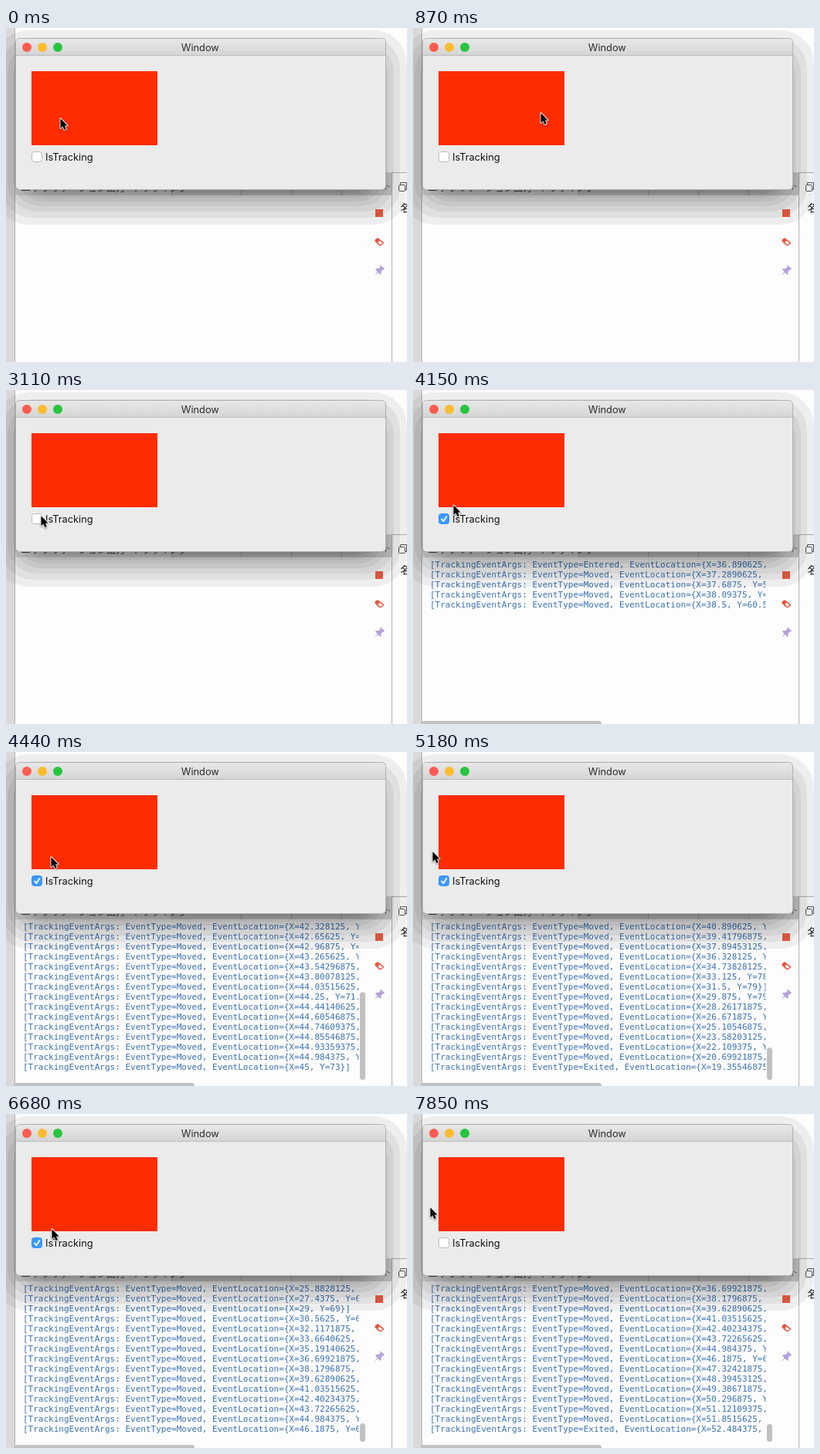
An HTML page with a canvas for the animation above (8 s loop, 519 by 433 pixels).

```html
<!DOCTYPE html>
<html lang="en">
<head>
<meta charset="utf-8">
<title>Mouse tracking demo</title>
<style>
html, body { margin: 0; width: 100%; height: 100%; overflow: hidden; background: #fdfdfd; }
canvas { display: block; }
</style>
</head>
<body>
<canvas id="stage" width="519" height="433"></canvas>
<script>
const ctx = document.getElementById('stage').getContext('2d');
const LOOP = 8000, STEP = 148.1, LAST_STEP = 53;
const CHECK_ON = 25, CHECK_OFF = 49, MOVES_PER_STEP = 12;
const UI_FONT = '12.8px Inter, sans-serif';
const CJK_FONT = '12px "Noto Sans CJK JP", "Noto Sans CJK", sans-serif';
const LOG_FONT = '11px "DejaVu Sans Mono", monospace';
const ROWS = 15, ROW_HEIGHT = 13;
const WIN = { x: 13, y: 13, w: 478, h: 196 };
const VIEW = { x: 33, y: 56, w: 163, h: 96 };

// Turning points of the pointer: [step, x, y].
const route = [
  [0, 70, 117], [5, 199, 109], [8, 66, 111], [12, 16, 112], [14, 16, 112],
  [20, 49, 163], [21, 45, 163], [26, 45, 161], [30, 58, 136], [32, 64, 131],
  [35, 25, 129], [36, 24, 128], [39, 58, 128], [41, 22, 127], [42, 17, 127],
  [46, 67, 153], [47, 62, 165], [49, 46, 165], [LAST_STEP, 22, 121]
];

function pointerAt(step) {
  const next = Math.max(1, route.findIndex(point => point[0] >= step));
  const [s0, x0, y0] = route[next - 1], [s1, x1, y1] = route[next];
  const u = (step - s0) / (s1 - s0), eased = u * u * (3 - 2 * u);
  return { x: x0 + (x1 - x0) * eased, y: y0 + (y1 - y0) * eased };
}

// The log follows from the route: every sample over the red view is reported.
function buildLog() {
  const entries = [], snap = v => Math.round(v * 256) / 256;
  let wasInside = false;
  for (let i = CHECK_ON * MOVES_PER_STEP; i < CHECK_OFF * MOVES_PER_STEP; i++) {
    const step = i / MOVES_PER_STEP, { x, y } = pointerAt(step);
    const inside = x >= VIEW.x && x < VIEW.x + VIEW.w && y >= VIEW.y && y < VIEW.y + VIEW.h;
    if (inside || wasInside) {
      const type = !inside ? 'Exited' : wasInside ? 'Moved' : 'Entered';
      const place = `{X=${snap(x - WIN.x)}, Y=${snap(WIN.y + WIN.h - y)}}`;
      entries.push({ step, line: `[TrackingEventArgs: EventType=${type}, EventLocation=${place}]` });
    }
    wasInside = inside;
  }
  return entries;
}
const log = buildLog();

function rect(x, y, w, h, fill) {
  ctx.fillStyle = fill;
  ctx.fillRect(x, y, w, h);
}

function rounded(x, y, w, h, r, fill, stroke) {
  ctx.beginPath();
  ctx.roundRect(x, y, w, h, r);
  if (fill) { ctx.fillStyle = fill; ctx.fill(); }
  if (stroke) { ctx.strokeStyle = stroke; ctx.lineWidth = 1; ctx.stroke(); }
}

function text(string, x, y, font, fill, align = 'left') {
  ctx.font = font;
  ctx.fillStyle = fill;
  ctx.textAlign = align;
  ctx.fillText(string, x, y);
}

function shape(path, x, y, fill, stroke, width = 1) {
  const p = new Path2D(path);
  ctx.save();
  ctx.translate(x, y);
  ctx.lineJoin = 'round';
  ctx.lineWidth = width;
  if (stroke) { ctx.strokeStyle = stroke; ctx.stroke(p); }
  if (fill) { ctx.fillStyle = fill; ctx.fill(p); }
  ctx.restore();
}

function drawBackdrop() {
  rect(0, 0, 519, 433, '#fdfdfd');
  rect(0, 0, 11, 433, '#d9d9d9');
  rect(11, 0, 1, 433, '#b4b4b4');
  rect(12, 187, 487, 30, '#d2d2d2');
  rect(12, 187, 202, 30, '#e2e2e2');
  for (const x of [214, 304, 369, 434]) rect(x, 187, 1, 30, '#aaa');
  rect(20, 205, 11, 6, '#444');
  text('アプリケーション出力 - トラッキング', 34, 212, CJK_FONT, '#444');
  text('テスト', 463, 210, CJK_FONT, '#777');
  rect(499, 187, 20, 1, '#b4b4b4');
  rect(499, 187, 1, 246, '#b4b4b4');
  rounded(508.5, 203.5, 8, 8, 1, null, '#555');
  shape('M0 0V-3H8V6H6', 510.5, 203.5, null, '#555');
  text('名', 510.5, 238, '13px "Noto Sans CJK JP", "Noto Sans CJK", sans-serif', '#111');
  rect(478, 235, 10, 10, '#ef6046');
  shape('M0 2L3 0L11 6L8 9H5L0 4Z', 478, 272.5, '#ea543f', '#ea543f');
  shape('M3.5 5L5.5 3.2L9.4 6.2L7.5 8H5.5Z', 478, 272.5, '#fff');
  shape('M7 0L13 5L12 6.5H10.5L8.5 9V12L7.5 13L4.5 10L0 14L3.5 9L1 6L2 5H5L7.5 3Z', 477, 307, '#b3a2dd');
}

function drawLog(count) {
  if (!count) return;
  ctx.save();
  ctx.beginPath();
  ctx.rect(14, 217, 442.5, 212);
  ctx.clip();
  log.slice(Math.max(0, count - ROWS), count).forEach(({ line }, i) =>
    text(line, 22, 230 + i * ROW_HEIGHT, LOG_FONT, '#3a70b2'));
  ctx.restore();
  if (count > ROWS) {
    const height = Math.max(21, 207 * 207 / (count * ROW_HEIGHT));
    rounded(458, 425 - height, 7, height, 3.5, '#c1c1c1');
  }
  rounded(10, 429, 234, 7, 3.5, '#c1c1c1');
}

// The soft shadow is a stack of visible bands, closer together towards the window.
function drawShadow() {
  for (let i = 0; i < 8; i++) {
    const spread = 28 - 9.5 * i + .5 * i * i;
    rounded(WIN.x - spread, WIN.y + 18 - spread, WIN.w + 2 * spread, WIN.h + 2 * spread,
      34 + spread * .35, 'rgba(0,0,0,.06)');
  }
}

function drawWindow(checked) {
  rounded(12.5, 13.5, 479, 196, 5, '#ebebeb', '#b0b0b0');
  const bar = ctx.createLinearGradient(0, 14, 0, 36);
  bar.addColorStop(0, '#e8e8e8');
  bar.addColorStop(1, '#d4d4d4');
  rounded(13, 14, 478, 22, [5, 5, 0, 0], bar);
  rect(13, 35, 478, 1, '#bcbcbc');
  ['#ff5b50', '#fdbc2e', '#27c53e'].forEach((fill, i) => rounded(21 + i * 20, 19, 12, 12, 6, fill));
  text('Window', 251.3, 30, UI_FONT, '#2c2c2c', 'center');
  rect(VIEW.x, VIEW.y, VIEW.w, VIEW.h, '#ff2c00');
  rounded(33.5, 160.5, 13, 13, 3, checked ? '#3b99fc' : '#fff', checked ? '#3b92f2' : '#b9b9b9');
  if (checked) shape('M0 3.5L2.7 6.7L7 0', 36.7, 163.5, null, '#fff', 1.8);
  text('IsTracking', 51, 172, UI_FONT, '#111');
}

function drawCursor({ x, y }) {
  ctx.save();
  ctx.shadowColor = 'rgba(0,0,0,.3)';
  ctx.shadowBlur = 2;
  ctx.shadowOffsetY = 1;
  shape('M0 0V12.8L3 10L5 14.8L7.3 13.8L5.3 9.2H9Z', Math.round(x) + .5, Math.round(y) + .2, '#000', '#fff', 2);
  ctx.restore();
}

function draw(t) {
  const step = Math.min(LAST_STEP, Math.floor((t + 25) / STEP));
  drawBackdrop();
  drawLog(log.filter(entry => entry.step <= step).length);
  drawShadow();
  drawWindow(step >= CHECK_ON && step < CHECK_OFF);
  drawCursor(pointerAt(step));
}

let began;
function tick(now) {
  began ??= now;
  draw(Math.max(0, now - began) % LOOP);
  requestAnimationFrame(tick);
}
requestAnimationFrame(tick);
</script>
</body>
</html>
```
